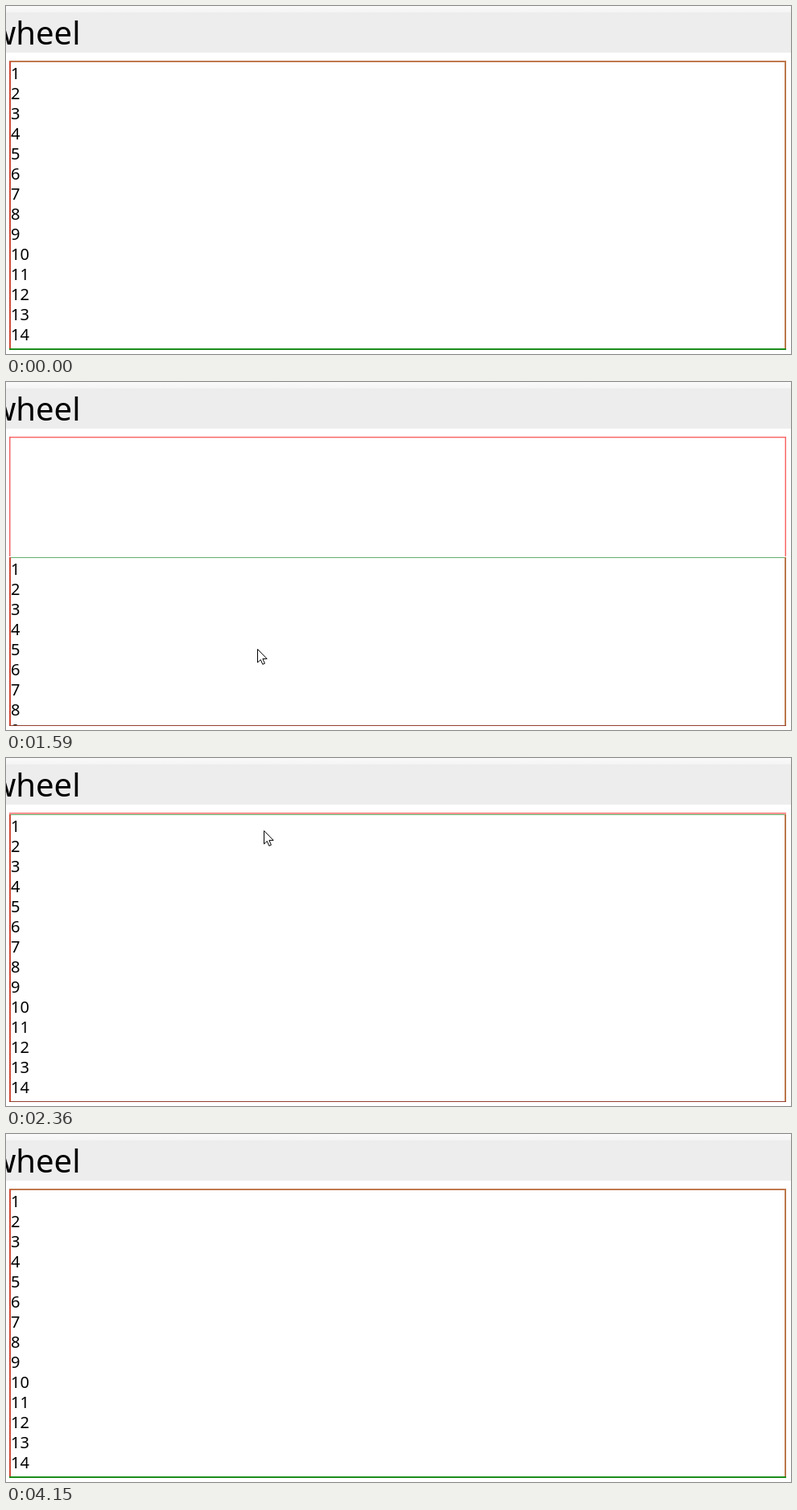
An HTML page with a canvas that plays this animation: 975x433 px, repeating every 4.47 s.

```html
<!DOCTYPE html>
<html lang="en">
<head>
<meta charset="utf-8">
<title>Pull list</title>
<style>
html, body { margin: 0; width: 100%; height: 100%; overflow: hidden; background: #fff; }
canvas { display: block; }
</style>
</head>
<body>
<canvas id="stage" width="975" height="433"></canvas>
<script>
const ctx = document.getElementById('stage').getContext('2d');
const LOOP = 4470;
const DRAG = 1060, RETURN = 1980, RELEASE = 2520;
const MAX_PULL = 149;

// Pointer strokes, sampled in discrete steps: first and last step time, count, path, easing power
const strokes = [
  { t0: 70,      t1: 580,  n: 7, from: [914, 472], to: [316, 92],  pow: 0.8 },
  { t0: 660,     t1: 830,  n: 3, from: [316, 92],  to: [314, 89],  pow: 1 },
  { t0: DRAG,    t1: 1520, n: 7, from: [313, 89],  to: [312, 304], pow: 1.449 },
  { t0: 1590,    t1: 1820, n: 4, from: [312, 304], to: [312, 370], pow: 0.619 },
  { t0: RETURN,  t1: 2440, n: 7, from: [309, 370], to: [322, 51],  pow: 0.844 },
  { t0: RELEASE, t1: 2670, n: 3, from: [322, 51],  to: [335, -25], pow: 1 },
  { t0: 3680,    t1: 4150, n: 7, from: [543, 56],  to: [994, 476], pow: 1 }
];

const clamp = (v, lo, hi) => Math.max(lo, Math.min(hi, v));

function pointerAt(t) {
  const s = strokes.filter(k => k.t0 <= t).pop();
  if (!s) return [0, -50];
  const step = Math.floor((t - s.t0) / (s.t1 - s.t0) * (s.n - 1) + 0.1);
  const p = Math.pow(clamp(step + 1, 1, s.n) / s.n, s.pow);
  return s.from.map((a, i) => Math.round(a + (s.to[i] - a) * p));
}

function pullAt(t, y) {
  if (t < DRAG || t >= RELEASE) return 0;
  return t < RETURN ? clamp(y - 89, 0, MAX_PULL) : clamp(y - 203, 1, MAX_PULL);
}

function box(color, x, y, w, h) {
  ctx.fillStyle = color;
  ctx.fillRect(x, y, w, h);
}

function drawHeader() {
  const shade = ctx.createLinearGradient(0, 0, 0, 8);
  shade.addColorStop(0, '#fafafa');
  shade.addColorStop(1, '#f4f4f4');
  box(shade, 0, 0, 975, 8);
  box('#ededed', 0, 8, 975, 50);
  ctx.fillStyle = '#000';
  ctx.font = '40px "Noto Sans", "Open Sans", sans-serif';
  ctx.textAlign = 'right';
  ctx.fillText('wheel', 92.5, 48);
}

function drawList(pull) {
  ctx.save();
  ctx.beginPath();
  ctx.rect(4, 68, 965, 359);
  ctx.clip();
  ctx.fillStyle = '#000';
  ctx.font = '20px "Noto Sans", "Open Sans", sans-serif';
  ctx.textAlign = 'left';
  for (let i = 1; i <= 14; i++) ctx.fillText(i, 6, 66 + 25 * i + pull);
  ctx.restore();
}

function drawBorders(pull) {
  const top = 69 + pull;
  if (pull) {
    box('#fb6c6c', 4, 68, 965, 1.5);
    box('#f06464', 4, 68, 1.5, pull);
    box('#f86868', 967.5, 68, 1.5, pull);
    box('#62b06a', 5, top, 963, 1);
  } else {
    box('#c0784f', 4, 68, 965, 2);
  }
  box('#cf4a38', 4, top, 2, 428 - top);
  box('#ba774c', 967, top, 2, 428 - top);
  if (pull) box('#93402f', 4, 427, 965, 1);
  else box('#1c8c1c', 4, 426, 965, 2);
}

function drawPointer(x, y) {
  const arrow = new Path2D('M0 0V16.5L3.8 13 6.3 18.8 8.9 17.7 6.4 11.9H11.6Z');
  ctx.save();
  ctx.translate(x + 0.5, y + 0.5);
  ctx.fillStyle = '#fff';
  ctx.strokeStyle = '#000';
  ctx.lineWidth = 1;
  ctx.fill(arrow);
  ctx.stroke(arrow);
  ctx.restore();
}

function draw(t) {
  const [x, y] = pointerAt(t);
  const pull = pullAt(t, y);
  box('#fff', 0, 0, 975, 433);
  drawHeader();
  drawList(pull);
  drawBorders(pull);
  drawPointer(x, y);
}

const start = performance.now();
function tick() {
  draw((performance.now() - start) % LOOP);
  requestAnimationFrame(tick);
}
tick();
</script>
</body>
</html>
```
